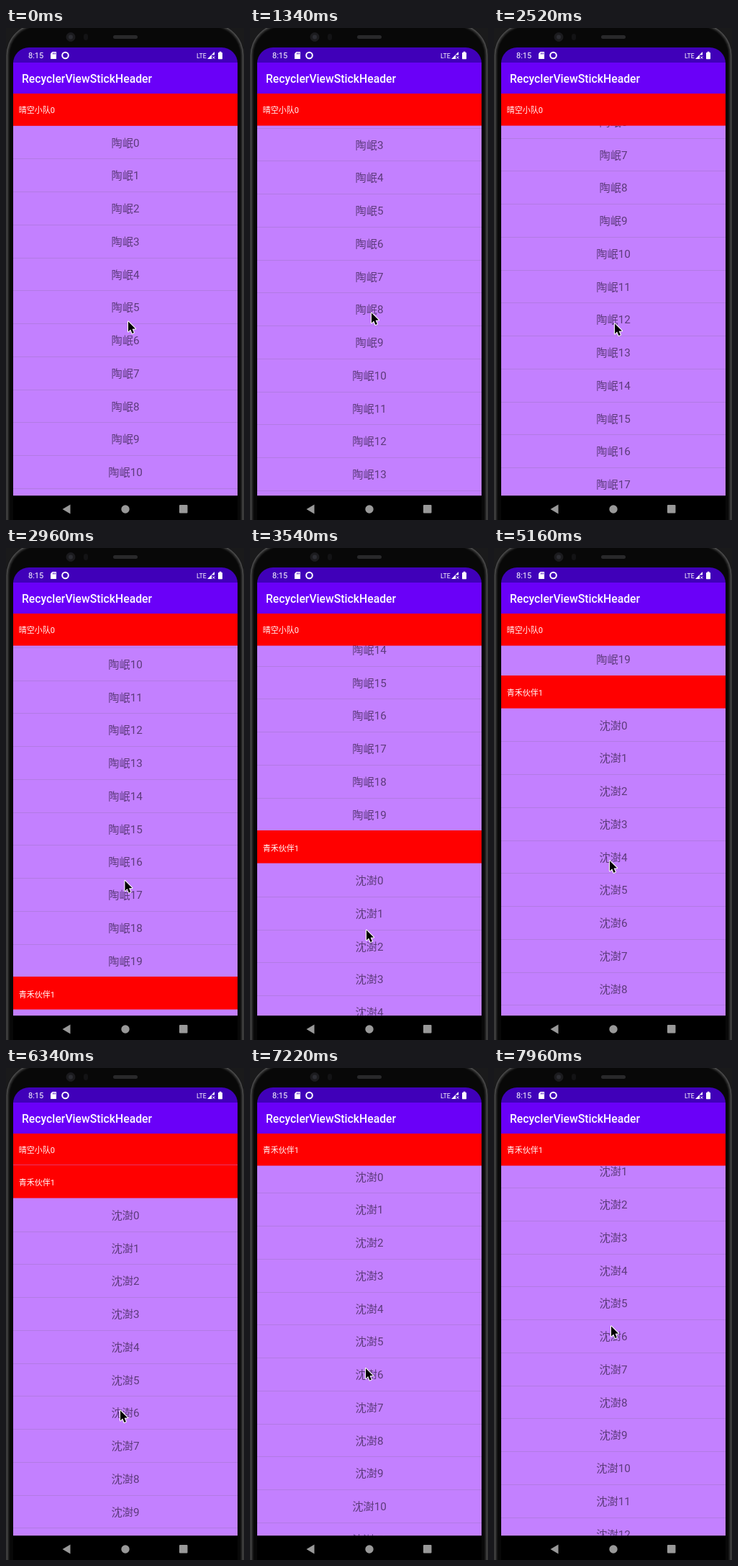
An HTML page with a canvas that plays this animation: 331x683 px, repeating every 8000 ms.

```html
<!DOCTYPE html>
<html lang="zh">
<head>
<meta charset="utf-8">
<title>Sticky header list</title>
<style>
html, body { margin: 0; width: 100%; height: 100%; overflow: hidden; background: #0c0c0d; }
canvas { display: block; width: 331px; height: 683px; }
</style>
</head>
<body>
<canvas id="stage"></canvas>
<script>
const W = 331, H = 683, LOOP = 8000;
const TICK = 147.25, TICK_OFFSET = 2.5;
const LEFT = 10, RIGHT = 322, WIDTH = RIGHT - LEFT;
const LIST_TOP = 91, LIST_BOTTOM = 649.5;
const ROW = 45.75, FIRST_TOP = 90.4, GROUP_SPAN = 21;
const FONT = 'Roboto, "Noto Sans CJK SC", "Noto Sans CJK", sans-serif';
const GROUPS = [
  { title: '晴空小队', member: '陶岷' },
  { title: '青禾伙伴', member: '沈澍' }
];

// Ends of the drags; the motion between them is linear.
const POSES = [
  { tick: 0, scroll: 0, x: 170, y: 407 },
  { tick: 1, scroll: 0, x: 170, y: 442 },
  { tick: 2, scroll: 0, x: 170, y: 442 },
  { tick: 9, scroll: 134.25, x: 169, y: 395 },
  { tick: 17, scroll: 303.25, x: 168, y: 410 },
  { tick: 24, scroll: 658.25, x: 162, y: 530 },
  { tick: 29, scroll: 813, x: 164, y: 372 },
  { tick: 39, scroll: 914.5, x: 159, y: 475 },
  { tick: 44, scroll: 915.75, x: 159, y: 475 },
  { tick: 54, scroll: 1021.9, x: 163, y: 358 }
];

const canvas = document.getElementById('stage');
const ctx = canvas.getContext('2d');
const scale = window.devicePixelRatio || 1;
canvas.width = W * scale;
canvas.height = H * scale;

function rect(x, y, w, h, color) {
  ctx.fillStyle = color;
  ctx.fillRect(x, y, w, h);
}

function disc(x, y, r, color) {
  ctx.fillStyle = color;
  ctx.beginPath();
  ctx.arc(x, y, r, 0, Math.PI * 2);
  ctx.fill();
}

function round(x, y, w, h, r, color) {
  ctx.fillStyle = color;
  ctx.beginPath();
  ctx.roundRect(x, y, w, h, r);
  ctx.fill();
}

function poly(points, color) {
  ctx.fillStyle = color;
  ctx.beginPath();
  points.forEach(([x, y]) => ctx.lineTo(x, y));
  ctx.closePath();
  ctx.fill();
}

function text(str, x, y, size, color, align = 'left', weight = 400) {
  ctx.font = `${weight} ${size}px ${FONT}`;
  ctx.textAlign = align;
  ctx.fillStyle = color;
  ctx.fillText(str, x, y);
}

function poseAt(tick) {
  const next = POSES.findIndex(pose => pose.tick > tick);
  if (next < 0) return POSES[POSES.length - 1];
  const a = POSES[next - 1], b = POSES[next];
  const p = (tick - a.tick) / (b.tick - a.tick);
  const mix = key => a[key] + (b[key] - a[key]) * p;
  return { scroll: mix('scroll'), x: mix('x'), y: mix('y') };
}

// Nested outlines shade the metal rim into the black bezel.
function drawPhone() {
  rect(0, 0, W, H, '#1a1a1b');
  for (let i = 0; i < 6; i++) {
    const shade = Math.round(70 * (1 - i / 5) ** 1.5) + 8;
    round(i + 0.5, i - 6, W - 1 - 2 * i, H + 80, 44 - i, `rgb(${shade},${shade},${shade})`);
  }
  round(149, 10, 34, 5, 2.5, '#29292b');
  disc(90, 12.5, 6.5, '#1b1b1e');
  disc(90, 12.5, 3, '#2c2d33');
  round(108, 8, 6, 9, 3, '#131315');
}

function drawHeader(group, top) {
  rect(LEFT, Math.floor(top), WIDTH, 45.6, '#ff0000');
  text(GROUPS[group].title + group, 17.7, top + ROW / 2 + 4.9, 11, '#fff');
}

function drawItem(label, top) {
  text(label, 166, top + ROW / 2 + 5.7, 15.25, '#5c3a7b', 'center');
  rect(LEFT, Math.floor(top + ROW), WIDTH, 1, 'rgba(90,90,90,.16)');
}

function drawList(scroll) {
  ctx.save();
  ctx.beginPath();
  ctx.rect(LEFT, LIST_TOP, WIDTH, LIST_BOTTOM - LIST_TOP);
  ctx.clip();
  rect(LEFT, LIST_TOP, WIDTH, LIST_BOTTOM - LIST_TOP, '#c380ff');

  const first = Math.floor(scroll / ROW);
  for (let row = first; row < first + 14; row++) {
    const top = FIRST_TOP + row * ROW - scroll;
    const group = Math.floor(row / GROUP_SPAN), index = row % GROUP_SPAN - 1;
    if (index < 0) drawHeader(group, top);
    else drawItem(GROUPS[group].member + index, top);
  }

  const current = Math.floor(first / GROUP_SPAN);
  const nextTop = (current + 1) * GROUP_SPAN * ROW - scroll;
  drawHeader(current, FIRST_TOP + Math.min(0, nextTop - ROW));
  ctx.restore();
}

function drawStatusIcons() {
  poly([[64.5, 33], [70, 33], [70, 43], [62, 43], [62, 35.5]], '#fff');
  for (let i = 0; i < 3; i++) rect(65 + i * 1.65, 34.3, 0.8, 2.2, '#4000b9');
  ctx.strokeStyle = '#fff';
  ctx.lineWidth = 2;
  ctx.beginPath();
  ctx.arc(82.5, 38, 4.3, 0, Math.PI * 2);
  ctx.stroke();

  poly([[290, 33], [290, 37.5], [286, 37.5], [286, 43], [280, 43]], '#fff');
  ctx.lineWidth = 1;
  ctx.beginPath();
  ctx.moveTo(287, 39.3);
  ctx.lineTo(290.3, 42.7);
  ctx.moveTo(290.3, 39.3);
  ctx.lineTo(287, 42.7);
  ctx.stroke();
  rect(296.7, 32.7, 2.8, 2, '#fff');
  round(295, 34, 6, 9.2, 0.7, '#fff');
}

function drawBars() {
  round(LEFT, 27, WIDTH, 22, [24, 24, 0, 0], '#4000b9');
  rect(LEFT, 48, WIDTH, 43, '#6a00f8');
  text('RecyclerViewStickHeader', 22, 75.7, 15.75, '#fff', 'left', 500);
  text('8:15', 31, 42, 11, '#fff');
  text('LTE', 265, 41.5, 8.8, '#fff');
  drawStatusIcons();

  rect(LEFT, LIST_BOTTOM, WIDTH, H - LIST_BOTTOM, '#000');
  poly([[78.5, 668], [89.5, 661.5], [89.5, 674.5]], '#999');
  disc(166, 668, 5.7, '#999');
  round(241, 662, 11.5, 11.5, 1, '#999');
}

function drawPointer(x, y) {
  ctx.save();
  ctx.translate(x, y + 0.5);
  ctx.lineWidth = 2;
  ctx.lineJoin = 'round';
  ctx.strokeStyle = '#fff';
  poly([[0, 0], [0, 14], [3.2, 11], [5.5, 16.5], [7.9, 15.4], [5.6, 10.2], [10, 10]], '#000');
  ctx.stroke();
  ctx.fill();
  ctx.restore();
}

function draw(time) {
  const tick = Math.max(0, Math.floor((time % LOOP - TICK_OFFSET) / TICK));
  const pose = poseAt(tick);
  ctx.setTransform(scale, 0, 0, scale, 0, 0);
  drawPhone();
  drawList(pose.scroll);
  drawBars();
  drawPointer(pose.x, pose.y);
}

const start = performance.now();
function loop() {
  draw(performance.now() - start);
  requestAnimationFrame(loop);
}
loop();
</script>
</body>
</html>
```
